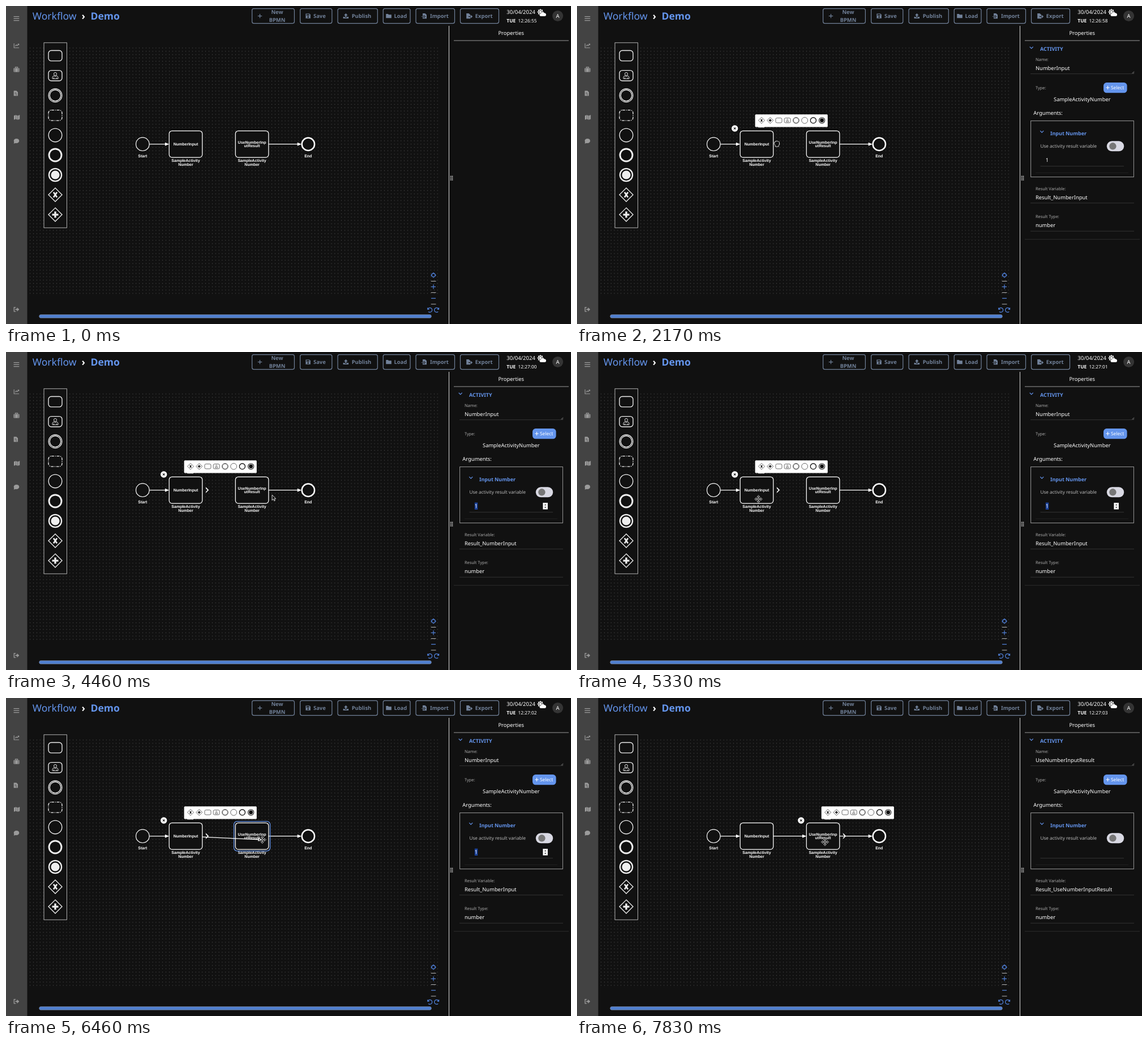
These frames come from a looping animation (998x561 px, 8000 ms). An HTML page:

```html
<!DOCTYPE html>
<html lang="en">
<head>
<meta charset="utf-8">
<title>Workflow editor</title>
<style>
html, body { margin: 0; width: 100%; height: 100%; overflow: hidden; background: #111; }
svg { display: block; width: 100vw; height: 100vh; }
text { font-family: "Noto Sans", "Open Sans", sans-serif; white-space: pre; text-rendering: geometricPrecision; }
.b { font-weight: 700; }
.m { text-anchor: middle; }
.d { font: 700 7.03px "Liberation Sans", Arial, sans-serif; text-anchor: middle; }
</style>
</head>
<body>
<svg id="stage" viewBox="0 0 998 561" fill="none"></svg>
<script>
const LOOP = 8000, BG = '#111', BLUE = '#6495ed', SLATE = '#718199', TOOL = '#4f7fd6', SIDE = '#9b9b9b';
const BOX_W = 58.55, BOX_H = 46.8, BOX_Y = 220.3, BOX1 = 288.2, BOX2 = 405.3, MID = 243.7;

const text = (x, y, size, str, fill = '#fff', cls = '') =>
  `<text x="${x}" y="${y}" font-size="${size}" fill="${fill}" class="${cls}">${str}</text>`;
const rect = (x, y, w, h, attrs, rx = 0) => `<rect x="${x}" y="${y}" width="${w}" height="${h}" rx="${rx}" ${attrs}/>`;
const circle = (x, y, r, attrs) => `<circle cx="${x}" cy="${y}" r="${r}" ${attrs}/>`;
const path = (d, attrs) => `<path d="${d}" ${attrs}/>`;
const stroke = (color, width = 1) => `stroke="${color}" stroke-width="${width}"`;
const solid = color => `fill="${color}"`;
const group = (x, y, body, attrs = '') => `<g transform="translate(${x} ${y})" ${attrs}>${body}</g>`;
const spin = (count, body) => Array.from({ length: count }, (_, i) => `<g transform="rotate(${i * 360 / count})">${body}</g>`).join('');
const hline = (x1, x2, y, color, width = 1) => path(`M${x1} ${y}H${x2}`, stroke(color, width));

// BPMN symbols, shared by the palette and the context menu
function symbol(kind, x, y, scale, ink, paper) {
  const line = `${stroke(ink, 1.35)} fill="${paper}"`;
  const task = extra => rect(-12, -9.2, 24, 18.4, line + extra, 5);
  const diamond = path('M0-12L12 0L0 12L-12 0Z', line);
  const shapes = {
    task: () => task(''),
    user: () => task('') + circle(0, -2.8, 2.6, stroke(ink, .9)) +
      path('M-5 5.5V3Q-4.5 .8-2 .3L0 2L2 .3Q4.5 .8 5 3V5.5ZM-2.6 5.5V3.4M2.6 5.5V3.4', stroke(ink, .9)),
    mid: () => circle(0, 0, 11.8, line) + circle(0, 0, 9.8, line),
    sub: () => task(' stroke-dasharray="5 1.6 1.3 1.6"'),
    start: () => circle(0, 0, 11.8, line),
    end: () => circle(0, 0, 11, `${stroke(ink, 2.9)} fill="${paper}"`),
    stop: () => circle(0, 0, 11.1, `${stroke(ink, 2.3)} fill="${paper}"`) + circle(0, 0, 7.6, solid(ink)),
    xor: () => diamond + path('M-3-4.5L3 4.5M3-4.5L-3 4.5', stroke(ink, 2.7)),
    and: () => diamond + path('M-5.5 0H5.5M0-5.5V5.5', stroke(ink, 3.4))
  };
  return `<g transform="translate(${x} ${y}) scale(${scale})">${shapes[kind]()}</g>`;
}

function grid() {
  let d = '';
  for (let i = 0; i < 75; i++) d += `M42.3 ${(74.05 + i * 5.85).toFixed(2)}H763`;
  return path(d, stroke('#b4b4b4', .66) + ' stroke-dasharray=".66 5.19"');
}

function sidebar() {
  const s = stroke(SIDE, 1.3), f = solid(SIDE);
  return rect(0, 0, 37.5, 561, solid('#434343')) +
    path('M13.5 18.7H23.3M13.5 22.2H23.3M13.5 25.7H23.3', stroke(SIDE, 1.2)) +
    group(18.5, 70, path('M-4.3-4V3.7H4.6M-2.4 1L-.3-1.4L1.2 0L4.2-3M2.2-3H4.2V-1', stroke(SIDE, 1.1))) +
    group(18.5, 112, rect(-5, -2.6, 10, 7, f, 1) + path('M-2-2.5V-4.2H2V-2.5', s) +
      path('M-2.9-2.6V4.4M2.9-2.6V4.4', stroke('#434343', .7))) +
    group(17.4, 154, path('M-3.7-4.5H1L3.6-2V4.6H-3.7Z', f) + path('M-2-1H1M-2 1H2M0 3H2', stroke('#434343', .8))) +
    group(19, 196.3, path('M-5-2.8L-2-4.1V3.2L-5 4.5ZM-1.4-4.1L1.6-2.9V4.4L-1.4 3.2ZM2.2-2.9L5.2-4.2V3.1L2.2 4.4Z', f)) +
    group(18.5, 238.2, `<ellipse cy="-.3" rx="4.8" ry="4" ${f}/>` + path('M-4 1L-4.8 4.5L0 3Z', f)) +
    group(18.5, 535.3, path('M-1.3-3.6H-4.2V3.6H-1.3', s) + path('M-2-1H1V-3.6L4.8 0L1 3.6V1H-2Z', f));
}

function button(x, w, icon, iconX, label, labelX) {
  return rect(x, 4.7, w, 25.9, stroke(SLATE, 1.2), 3) + group(iconX, 17.6, icon) +
    (label ? text(labelX, 20.9, 9.4, label, SLATE, 'b') : '');
}

function weather() {
  const white = solid('#fff');
  return group(944, 10.6, spin(8, path('M-1.7-3.4L0-5.8L1.7-3.4Z', white)) + circle(0, 0, 4.1, white) +
    circle(0, 0, 3.1, solid(BG)) + circle(0, 0, 2.4, white)) +
    group(948, 14, path('M-3 4A2.5 2.5 0 0 1-3-1A3.1 3.1 0 0 1 2.6-1.8A2.9 2.9 0 0 1 3.5 4Z', `${white} ${stroke(BG, 1)} paint-order="stroke"`));
}

function header() {
  const f = solid(SLATE), s = stroke(SLATE, 1.4), cut = solid(BG);
  const sheet = path('M-3-4.6H1.2L4-2V4.6H-3Z', f);
  return text(46.8, 24, 17.5, 'Workflow', BLUE) + text(133.6, 24, 17.5, '›', '#fff', 'b') +
    text(149.5, 24, 17.5, 'Demo', BLUE, 'b') +
    button(434.6, 74.8, path('M-3.7 0H3.7M0-3.7V3.7', stroke(SLATE, 1.2)), 448.5) +
    text(479, 14.2, 9.4, 'New', SLATE, 'b m') + text(479, 28, 9.4, 'BPMN', SLATE, 'b m') +
    button(519.6, 56.2, path('M-4.2-4.2H2.4L4.2-2.4V4.2H-4.2Z', f) + rect(-2.8, -3, 4.8, 2.2, cut) + circle(0, 1.8, 1.3, cut), 533.6, 'Save', 543) +
    button(586, 70.3, path('M-1.2 1.8V-1.2H-3.4L0-4.7L3.4-1.2H1.2V1.8Z', f) + path('M-4.7 1.4H-2V2.8H2V1.4H4.7V4.3H-4.7Z', f), 600.3, 'Publish', 610.7) +
    button(666.2, 47.8, path('M-4.8-3.6H-1.2L0-2.3H4.8V3.6H-4.8Z', f), 676, 'Load', 685.4) +
    button(724, 68.5, sheet + path('M-5.2 1H0M-1.3-1L.9 1L-1.3 3', stroke(BG, 1.8)) + path('M-5.2 1H.3M-1.5-1L.5 1L-1.5 3', stroke(SLATE, .8)), 739, 'Import', 749) +
    button(802.5, 68, group(-1.6, 0, sheet) + path('M-1 1H2.4', stroke(BG, 1.2)) + path('M2.4 1H5M3.2-1.2L5.4 1L3.2 3.2', s), 817.8, 'Export', 828.8) +
    text(884.3, 14, 9.5, '30/04/2024') + text(884.3, 28.8, 8.4, 'TUE', '#fff', 'b') +
    '<text id="clock" x="904.6" y="28.8" font-size="8.3" fill="#fff"></text>' + weather() +
    circle(974.6, 17.5, 9.5, solid('#343434')) + text(974.6, 20.9, 9.4, 'A', '#fff', 'm');
}

function palette() {
  const kinds = ['task', 'user', 'mid', 'sub', 'start', 'end', 'stop', 'xor', 'and'];
  return rect(67, 64.8, 40.4, 326.4, `${solid(BG)} ${stroke('#c4c4c4', .9)}`) +
    kinds.map((k, i) => symbol(k, 87, 87.7 + i * 35.05, 1, '#eee', BG)).join('');
}

function tools() {
  const s = stroke(TOOL, 1.2);
  const turn = path('M-3.9-4V-1H-1M-3.6-1.2A3.9 3.9 0 1 1-2.6 3', stroke(TOOL, 1.3));
  return rect(58.7, 544.6, 692.6, 5.6, `${solid('#4f7fd0')} ${stroke('#8590a6', .7)}`, 2.8) +
    group(755, 474.8, circle(0, 0, 3.2, s) + path('M0-4.8V-2M0 4.8V2M-4.8 0H-2M4.8 0H2', s)) +
    path('M751 495.3H759M755 491.3V499.3M751 515.7H759', s) +
    [485.5, 505.6, 526].map(y => hline(750.7, 759.5, y, '#ccc', .9)).join('') +
    group(748.7, 536.2, turn) + group(760.6, 536.2, `<g transform="scale(-1 1)">${turn}</g>`);
}

const arrow = (x1, x2) => hline(x1, x2 - 5, MID, '#fff', 1.2) +
  path(`M${x2} ${MID}l-7.3-3v6Z`, solid('#fff'));

function activity(x, lines) {
  const cx = x + BOX_W / 2, top = lines.length > 1 ? 242.5 : 246.1;
  return rect(x, BOX_Y, BOX_W, BOX_H, `${solid(BG)} ${stroke('#fff', 1.25)}`, 5) +
    [...lines.map((l, i) => [l, top + i * 6.9]), ['SampleActivity', 275.3], ['Number', 282.2]]
      .map(([l, y]) => `<text x="${cx}" y="${y}" class="d" fill="#fff">${l}</text>`).join('');
}

function diagram() {
  return circle(241.3, MID, 11.8, `${solid(BG)} ${stroke('#fff', 1.2)}`) +
    circle(533.8, MID, 11.2, `${solid(BG)} ${stroke('#fff', 2.5)}`) +
    `<text x="241.3" y="267.1" class="d" fill="#fff">Start</text><text x="533.8" y="267.1" class="d" fill="#fff">End</text>` +
    activity(BOX1, ['NumberInput']) + activity(BOX2, ['UseNumberInp', 'utResult']) +
    arrow(253.2, BOX1) + arrow(BOX2 + BOX_W, 522) +
    `<g id="link">${arrow(BOX1 + BOX_W, BOX2)}</g>` +
    `<g id="preview">${rect(BOX2 - 2.7, BOX_Y - 2.7, BOX_W + 5.4, BOX_H + 5.4, 'id="halo" ' + stroke(BLUE, 1.3), 5.5)}
      <path id="wire" ${stroke('#fff', 1.2)}/><path id="tip" d="M0 0L-7.3-3V3Z" fill="#fff"/></g>`;
}

// Close button, symbol menu and connect handle around the selected activity
function contextMenu() {
  const kinds = ['xor', 'and', 'task', 'user', 'mid', 'start', 'end', 'stop'];
  return `<g id="menu">${circle(278.7, 216, 5.7, solid('#fff'))}
    ${path('M277 214.3L280.4 217.7M280.4 214.3L277 217.7', stroke('#111', 1.1))}
    ${rect(314.6, 191.2, 128.2, 22.2, solid('#fff'), 1.5)}${rect(320, 213, 11, 1.3, solid('#fff'))}
    ${kinds.map((k, i) => symbol(k, 326 + i * 15.23, 201.8, .46, '#111', '#fff')).join('')}
    ${path('M353 239.4L357 243.6L353 247.8', stroke('#fff', 1.6))}</g>`;
}

function panel() {
  const dim = '#aaa', rule = '#333';
  const fold = (x, y) => path(`M${x - 3} ${y - 1.6}L${x} ${y + 1.5}L${x + 3} ${y - 1.6}`, stroke(BLUE, 1.2));
  return path('M782.5 35V561', stroke('#ccc', 1.1)) +
    [300.6, 303.6, 306.6].map(y => rect(784.7, y - .9, 1.8, 1.8, solid('#ccc')) + rect(787.5, y - .9, 1.8, 1.8, solid('#ccc'))).join('') +
    text(892.2, 51.3, 9.4, 'Properties', '#fff', 'm') + hline(791, 994, 61, '#999') +
    `<g id="props">${fold(802.7, 73.5)}${text(818, 79.4, 9, 'ACTIVITY', BLUE, 'b')}
    ${text(810, 96.6, 7.4, 'Name:', dim)}<text id="name" x="810" y="112.7" font-size="9.36" fill="#fff"></text>
    ${hline(801, 984, 119.6, rule)}${path('M980.5 119L984 115.5M982.5 119L984 117.5', stroke('#aaa', .7))}
    ${text(810, 146.6, 7.4, 'Type:', dim)}${rect(930, 135.1, 41.6, 18.2, solid(BLUE), 5.5)}
    ${path('M934.3 144H940.7M937.5 140.8V147.2', stroke('#fff', 1))}${text(943, 147, 8.4, 'Select')}
    ${text(892.3, 168.4, 9.36, 'SampleActivityNumber', '#fff', 'm')}
    ${text(806.3, 191.6, 9.4, 'Arguments:')}
    ${rect(801.6, 202.6, 181.8, 99, stroke('#999', 1))}
    ${fold(821.2, 221.7)}${text(836, 227.9, 8.95, 'Input Number', BLUE, 'b')}
    ${text(818.5, 249.9, 8.15, 'Use activity result variable', '#bbb')}
    ${rect(935.8, 238.3, 30.4, 18, solid('#d9d9e3'), 9)}${circle(946.4, 247.3, 6.2, solid('#777'))}
    ${rect(827.8, 265.6, 5.4, 12.4, 'id="marked" ' + solid('#1c439c'))}
    <g id="value">${text(827.8, 275.4, 9.36, '1')}</g>
    <g id="spin">${rect(948.4, 266, 8.5, 11.6, solid('#fff'))}${path('M950.9 270.4L952.6 268.2L954.3 270.4ZM950.9 273.2L952.6 275.4L954.3 273.2Z', solid('#333'))}</g>
    ${hline(818.5, 966, 282.6, rule)}${hline(810, 974, 294.2, '#222')}
    ${text(810, 324.6, 7.4, 'Result Variable:', dim)}<text id="result" x="810" y="340.7" font-size="9.36" fill="#fff"></text>
    ${hline(801, 984, 347.6, rule)}
    ${text(810, 374, 7.4, 'Result Type:', dim)}${text(810, 390, 9.36, 'number')}
    ${hline(801, 984, 397.2, rule)}${hline(791, 994, 411.6, '#2c2c2c')}</g>`;
}

function pointers() {
  const edge = `${solid(BG)} ${stroke('#fff', .8)} stroke-linejoin="round"`;
  const fine = `${solid(BG)} ${stroke('#fff', .65)} stroke-linejoin="round"`;
  return `<g id="pointer"><g id="arrow">${path('M0 0V9.5L2.2 7.4L3.8 10.8L5.3 10.1L3.8 6.9H6.7Z', edge)}</g>
    <g id="move">${spin(4, path('M0-6.8L2.5-3.8H-2.5Z', fine))}${path('M-.7-2.6H.7V-.7H2.6V.7H.7V2.6H-.7V.7H-2.6V-.7H-.7Z', fine)}</g>
    <g id="hand">${path('M-2.8 5V3L-4.6 .2V-2Q-4.4-3.2-3-2.8V-4Q-2-5.2-.9-4.4Q.2-5.4 1.2-4.3Q2.5-5 3.1-3.6Q4.4-3.8 4.5-2.3V1L3.2 3.2V5Z', edge)}</g>
    <g id="beam">${path('M-2-5.2Q0-5.2 0-4V4.2Q0 5.4-2 5.4M2-5.2Q0-5.2 0-4M0 4.2Q0 5.4 2 5.4M-1.3 1.6H1.3', stroke('#fff', 1.1))}</g></g>`;
}

document.getElementById('stage').innerHTML = rect(0, 0, 998, 561, solid(BG)) + grid() + sidebar() + header() +
  palette() + tools() + diagram() + contextMenu() + panel() + pointers();

const el = {};
document.querySelectorAll('[id]').forEach(node => el[node.id] = node);
const show = (id, on) => el[id].setAttribute('display', on ? 'inline' : 'none');
const put = (id, str) => { if (el[id].textContent !== str) el[id].textContent = str; };

const SELECT = 1600, PRESS = 5820, DROP = 6640;
const TICKS = [110, 1200, 2120, 3120, 4120, 5120, 6120, 7120];
// pointer stops: time, x, y
const STOPS = [
  [880, 446, 532], [1000, 367, 354], [1170, 367, 354], [1420, 323, 235], [1880, 323, 235],
  [2150, 353, 243], [3040, 353, 243], [3400, 800, 282], [3570, 840, 272], [3880, 840, 272],
  [4000, 828, 272], [4460, 470, 252], [4670, 470, 252], [5320, 320.5, 259.5], [5500, 320.5, 259.5],
  [5740, 354, 243], [PRESS, 354, 243], [6290, 452, 249], [6460, 452.7, 250], [6630, 452.7, 250],
  [7420, 445, 249], [7710, 445, 249], [7830, 438, 254]
];

function pointerAt(t) {
  const i = STOPS.findIndex(s => s[0] > t);
  if (i < 1) return STOPS[i < 0 ? STOPS.length - 1 : 0].slice(1);
  const [t0, x0, y0] = STOPS[i - 1], [t1, x1, y1] = STOPS[i];
  const u = (t - t0) / (t1 - t0), k = u * u * (3 - 2 * u);
  return [x0 + (x1 - x0) * k, y0 + (y1 - y0) * k];
}

const inBox = (x, y, left) => x > left && x < left + BOX_W && y > BOX_Y && y < BOX_Y + BOX_H;

function pointerKind(t, x, y) {
  if (t >= PRESS && t < DROP || inBox(x, y, BOX1) || inBox(x, y, BOX2)) return 'move';
  if (t > SELECT && Math.abs(x - 354) < 6 && Math.abs(y - MID) < 7) return 'hand';
  return x > 815 && x < 948 && y > 262 && y < 284 ? 'beam' : 'arrow';
}

function draw(t) {
  const sec = 55 + TICKS.filter(k => t >= k).length;
  put('clock', `12:${26 + Math.floor(sec / 60)}:${String(sec % 60).padStart(2, '0')}`);

  const [x, y] = pointerAt(t), kind = pointerKind(t, x, y), done = t >= DROP;
  show('pointer', t >= 880);
  el.pointer.setAttribute('transform', `translate(${x} ${y})`);
  ['arrow', 'move', 'hand', 'beam'].forEach(k => show(k, k === kind));

  const name = done ? 'UseNumberInputResult' : 'NumberInput';
  put('name', name);
  put('result', 'Result_' + name);
  show('props', t >= SELECT);
  show('menu', t >= SELECT);
  el.menu.setAttribute('transform', `translate(${done ? BOX2 - BOX1 : 0} 0)`);
  show('value', !done);
  show('spin', t >= 3450 && !done);
  show('marked', t >= 3980 && !done);

  show('link', done);
  const dragging = t >= PRESS && !done && x > 358;
  show('preview', dragging);
  show('halo', inBox(x, y, BOX2));
  if (dragging) {
    const cx = BOX1 + BOX_W / 2, slope = (y - MID) / (x - cx), left = BOX1 + BOX_W;
    el.wire.setAttribute('d', `M${left} ${MID + (left - cx) * slope}L${x - 4} ${y - 4 * slope}`);
    el.tip.setAttribute('transform', `translate(${x} ${y}) rotate(${Math.atan(slope) * 180 / Math.PI})`);
  }
}

const begin = performance.now();
function tick() {
  draw((performance.now() - begin) % LOOP);
  requestAnimationFrame(tick);
}
tick();
</script>
</body>
</html>
```
